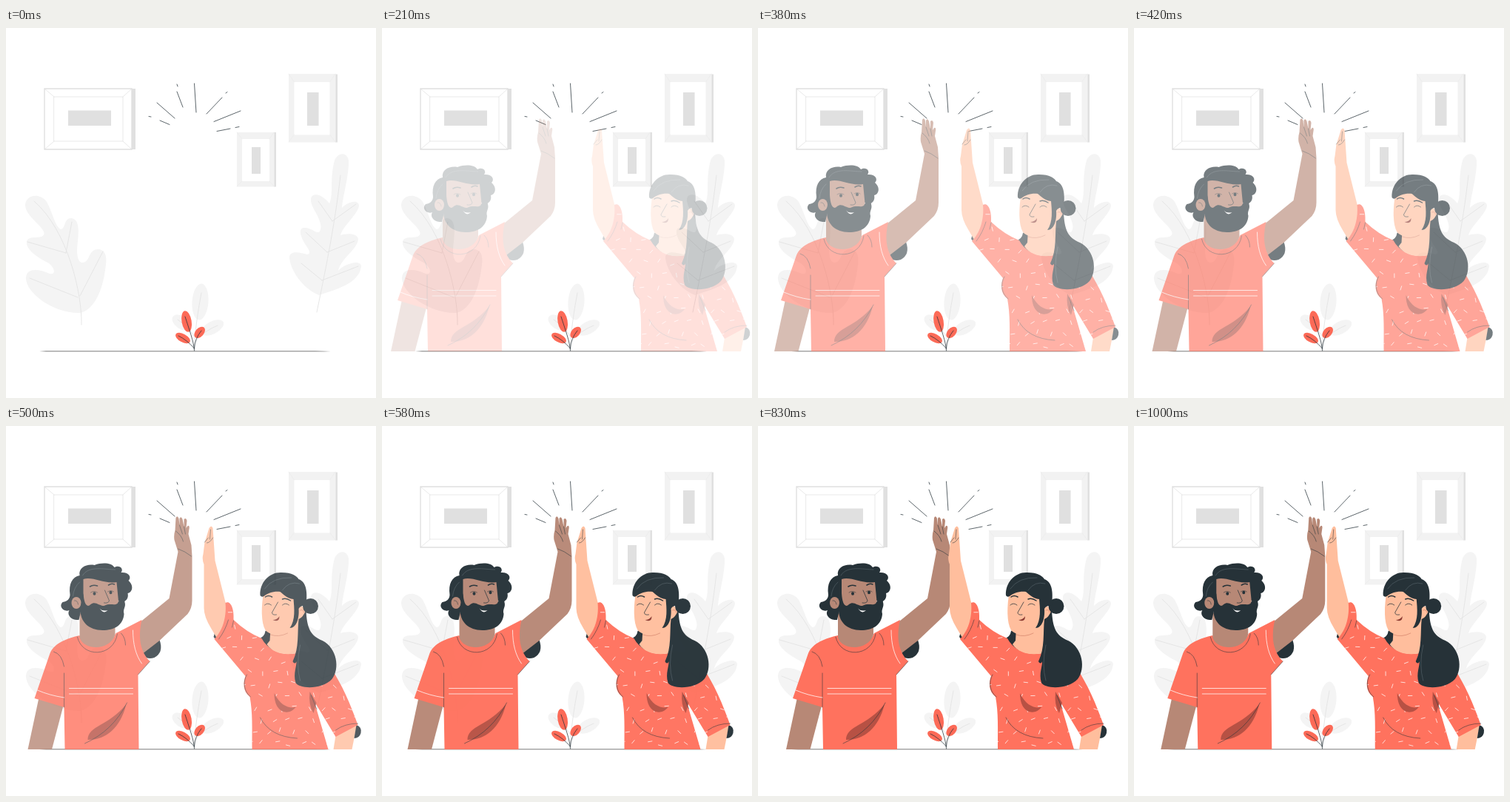
Recreate the animation shown at these times as an HTML page. Size 500 by 500 pixels, loop 1.04 s.

```html
<!DOCTYPE html>
<html lang="en">
<head>
<meta charset="utf-8">
<title>High five</title>
<style>
  html, body { margin: 0; width: 100%; height: 100%; overflow: hidden; background: #fff; }
  svg { display: block; width: 100vw; height: 100vh; }
  .line { fill: none; stroke-linecap: round; stroke-linejoin: round; }
  .ink { stroke: #263238; stroke-width: .75; }
  .thin { stroke-width: .55; }
  .vein { stroke: #e4e4e4; stroke-width: .9; }
  .edge { stroke: #e0e0e0; stroke-width: 1; }
  .white { stroke: #fff; stroke-width: .75; }
  .shine { stroke: #58666c; stroke-width: .6; }
  .dark { fill: #263238; }
  .shirt { fill: #ff725e; }
  .shade { fill: #b75144; }
  .tan { fill: #b78876; }
  .peach { fill: #ffbe9d; }
  .pale { fill: #f4f4f4; }
  .gray { fill: #e0e0e0; }
  .red { fill: #fc6a57; }
</style>
</head>
<body>
<svg viewBox="0 0 500 500">
  <defs>
    <path id="blouse" d="M288 239C295 235 300 247 299 262Q317 279 337 287C346 305 370 312 386 306L430 326C446 350 457 376 467 404L437 420L408 372L427 437H324C324 408 325 388 321 366C311 358 312 346 315 338L273 288C283 278 290 260 288 239Z"/>
    <clipPath id="blouseClip"><use href="#blouse"/></clipPath>
  </defs>

  <g id="frames">
    <path class="gray" d="M170 82h5v82h-5z"/>
    <rect class="line edge" x="52" y="82" width="118" height="82" style="stroke-width:1.4"/>
    <path class="line edge" d="M65 93H158V153H65ZM52 82L65 93M170 82L158 93M52 164L65 153M170 164L158 153" style="stroke-width:.7"/>
    <path class="gray" d="M84 111.500h58v20.500h-58zM445 62.500h3v92h-3zM362 141h3v73.500h-3z"/>
    <path class="pale" d="M382 62h63.500v92.500H382zM312 141h50.500v73.500H312z" style="fill:#f2f2f2"/>
    <path d="M389.500 73h48v71.500h-48zM319 150h37v57h-37z" fill="#fff"/>
    <path class="gray" d="M407 87h15.500v45H407zM332 161h12v36h-12z"/>
    <path class="line" stroke="#e9e9e9" stroke-width=".6" d="M382 62l7.500 11M445 62l-7.500 11M382 154l7.500-10M445 154l-7.500-10M312 141l7 9M362 141l-6 9M312 214l7-7M362 214l-6-7"/>
  </g>

  <g id="leaves">
    <path class="pale" d="M100 385C64 386 27 358 27 338C27 324 44 325 59 332C67 334 67 325 58 318C40 309 26 298 28 288C31 281 40 284 48 282C54 279 52 275 45 267C34 256 26 248 26 239C27 225 46 222 55 235C63 249 66 268 74 272C81 271 78 257 88 257C98 258 99 270 97 288C94 312 99 320 107 316C114 312 112 299 125 299C136 300 137 312 134 327C130 358 117 382 100 385Z"/>
    <path class="line vein" d="M102 401C103 360 84 274 38 234M81 304L29 289M81 304L89 262M97 364L32 338M100 362L131 302"/>
    <path class="pale" d="M423 361C400 352 383 325 383 309C385 300 399 304 407 306C414 305 408 298 403 290C396 278 396 270 403 270C411 269 418 277 423 276C428 270 425 262 419 250C411 237 410 229 415 226C423 223 432 231 437 237C443 225 437 204 444 179C449 166 465 167 463 185C462 205 455 228 454 243C460 236 476 230 477 240C476 251 455 268 452 280C460 277 476 277 476 286C474 300 452 312 449 328C457 319 479 312 480 322C477 346 446 353 423 361Z"/>
    <path class="line vein" d="M420 384C430 335 444 270 452 199M441 261L422 234M441 261L473 238M434 303L405 276M434 303L471 288M427 341L399 318M427 341L476 322"/>
    <ellipse class="pale" cx="262.500" cy="370" rx="11" ry="24.500" transform="rotate(4 262 370)"/>
    <ellipse class="pale" cx="237" cy="398" rx="14" ry="8.500" transform="rotate(35 237 398)"/>
    <ellipse class="pale" cx="279" cy="405" rx="16.500" ry="8.500" transform="rotate(-28 279 405)"/>
    <path class="line vein" d="M254 434Q256 400 264 358M255 424Q268 409 286 402M255 417Q246 404 232 394"/>
  </g>

  <path d="M45 437L54 436H418L439 437L430 437.500H54Z" fill="#a6a6a6"/>

  <g id="sprig">
    <ellipse class="red" cx="244" cy="396.500" rx="6.600" ry="14.500" transform="rotate(-10 244 396)"/>
    <ellipse class="red" cx="239" cy="419" rx="11" ry="5.500" transform="rotate(29 239 419)"/>
    <ellipse class="red" cx="262" cy="411.500" rx="5.700" ry="9" transform="rotate(42 262 411)"/>
    <path class="line ink" d="M254.500 436C254 424 247 406 242 390M254.500 433Q244 421 233 416M254.500 433Q255 420 264 409"/>
  </g>

  <path id="rays" class="line ink" d="M204 101L228 122M231 86L239 107M231 76L232 79M254.500 75L257 114M271 116L292 94M297 88L299 86.500M281 126.500L317 112M285 139.500L303 136M310 134.500L315 133.500M208 125L221 130.500M193 119.500L196 120"/>

  <g id="man">
    <path class="tan" d="M53 367L38 437H70.500L86 378Z"/>
    <path class="dark" d="M193 306L216 289Q222 306 209 313Q203 315 198 313Z"/>
    <path class="tan" d="M241 170L236 154Q235 147 237 141L238 124Q240 120 242 125L243 134L243 125Q245 121 247 126L249 136L249 126Q252 123 253 128L252 138L254 135Q257 134 256 139L255 146L259 161L260 176V236Q260 246 254 254L216 290L194 307L184 282L191 264L229 233Z"/>
    <path class="line ink thin" d="M243 134L247 146M249 136L251 146M238 142Q246 148 248 156M241 166Q250 169 259 176"/>
    <path class="shirt" d="M108 283C91 287 74 293 68 307L47 368L87 380L88 437H188L187 336L203 318C187 302 188 280 192 262L157 280C148 303 114 304 108 283Z"/>
    <path class="tan" d="M108 252V286C114 304 149 304 156 282V260Z"/>
    <path class="line ink thin" d="M105 285C111 314 154 313 159 281M87 380V334M73 305Q84 308 87 325M164 280Q170 286 170 296M187 336L203 318"/>
    <path class="line white" d="M94 354.500H180M94 362H180M51 357Q67 364 87 367M180 276C180 295 184 310 192 321"/>
    <path class="shade" d="M119 424C119 405 148 405 171 376C163 409 142 425 119 424Z"/>
    <path class="line ink thin" d="M115 429Q153 412 172 374"/>

    <path class="dark" d="M107 262C98 263 90 256 94 249C87 252 79 244 85 238C92 237 95 233 95 228C93 213 98 204 108 202C106 191 118 186 128 188C139 184 151 185 155 191C162 187 168 193 164 198C174 197 179 204 174 209C182 216 179 225 173 226C175 234 168 241 160 236L150 220L112 240Z"/>
    <path class="tan" d="M113 207C126 203 141 214 158 211L161 242C161 262 145 270 130 268L113 258Z"/>
    <ellipse class="tan" cx="103.500" cy="239" rx="6.500" ry="8"/>
    <path class="line ink thin" d="M101 236Q105 235 106 241"/>
    <path class="dark" d="M113 226C114 241 118 246 123 241C129 236 134 243 141 243C149 239 155 243 159 240C163 232 168 231 169 238C171 245 166 247 168 254C167 269 155 276 139 276C121 276 108 265 109 246Z"/>
    <path d="M135 246Q138 251 146 249Q140 255 135 246Z" fill="#fff"/>
    <path class="line ink" d="M142 222L148 236Q147 240 141 239"/>
    <path class="line ink" d="M122 217Q126 214 132 216M147 215Q151 212 155 214" style="stroke-width:1.600"/>
    <path class="dark" d="M126 226.500a2 2.200 0 1 0 4 0a2 2.200 0 1 0-4 0M148 225a2 2.200 0 1 0 4 0a2 2.200 0 1 0-4 0"/>
    <path class="line ink thin" d="M123 225Q127 222 132 225M146 224Q150 221 154 224"/>
    <path class="line shine" d="M112 202C120 188 142 194 156 194M99 230Q100 218 108 211"/>
  </g>

  <g id="woman">
    <path class="peach" d="M438 412L434 437H459L466 402Z"/>
    <path class="dark" d="M465 404Q473 407 471 415Q469 422 462 422Z"/>
    <path class="dark" d="M274 278L272 285L277 291L284 284Z"/>
    <path class="peach" d="M260 157L262 151L266 138Q269 133 271 138L274 182L288 238L302 268L279 291L269 274Q259 258 259 246V187Q256 180 258 173Z"/>
    <path class="line ink thin" d="M268 140L267 153M260 157L265 151M271 151Q267 158 263 158"/>
    <path class="dark" d="M349 273L352 305L345 299L331 288Q341 286 342 277Z"/>
    <use class="shirt" href="#blouse"/>
    <g id="dashes" class="line white" clip-path="url(#blouseClip)"></g>
    <path class="shade" d="M354 361C362 378 374 382 383 380C374 392 354 389 354 361ZM402 359Q400 377 407 388L411 374Z"/>
    <path class="line ink thin" d="M317 336C311 346 313 359 322 366M335 394Q348 420 385 422M404 364L411 382M437 411Q449 402 467 402M299 263L297 272M292 262Q288 276 279 288"/>
    <path class="peach" d="M349 274L348 290L344 295C354 310 376 310 387 306L390 258Z"/>
    <path class="peach" d="M340 222C336 245 336 265 342 276C352 286 370 284 381 271L391 256V222Z"/>
    <ellipse class="peach" cx="391" cy="252" rx="6" ry="8"/>
    <path class="line" stroke="#d98a70" stroke-width=".8" d="M349 282Q360 286 372 280M389 249Q393 247 394 252"/>
    <circle class="dark" cx="403" cy="243.500" r="10.500"/>
    <path class="dark" d="M397 248C398 274 403 283 419 290C439 300 443 328 432 342C419 356 389 356 383 347C379 334 385 324 384 316C385 321 380 322 379 318C388 300 385 279 387 261Q393 259 397 248Z"/>
    <path class="dark" d="M335 229C334 211 348 197 364 198C378 198 385 203 387 207C398 211 399 225 397 243Q390 242 387 247C388 260 384 273 375 273C383 262 381 246 380 234C371 233 366 227 362 224C353 223 345 226 340 230Q337 232 335 229Z"/>
    <path class="line shine" d="M341 220Q352 204 377 205M365 222Q374 209 388 213M389 296Q383 323 389 344"/>
    <path class="line ink" d="M341 242Q345 238 350 242M365 242Q369 238 374 242M359 238L351 252Q351 256 357 255"/>
    <path class="line ink" d="M342 231Q346 228 351 231M365 234Q370 232 376 236" style="stroke-width:1.500"/>
    <path d="M352 262Q358 262 361 257Q361 266 352 262Z" fill="#8c3b32"/>
  </g>
</svg>
<script>
  const LOOP = 1040, STEP = 1000 / 24;
  const SLIDE = 30, SWAY = 2.5;
  const man = document.getElementById('man');
  const woman = document.getElementById('woman');
  const clamp = v => Math.min(1, Math.max(0, v));

  // Small strokes scattered over the blouse on a jittered grid
  function scatterDashes() {
    let seed = 7, d = '';
    const random = () => (seed = seed * 16807 % 2147483647) / 2147483647;
    for (let y = 250; y < 437; y += 16) {
      for (let x = 276 + y % 32 / 2; x < 470; x += 18) {
        const angle = random() * Math.PI;
        const dx = 2.7 * Math.cos(angle), dy = 2.7 * Math.sin(angle);
        const cx = x + random() * 6, cy = y + random() * 6;
        d += `M${cx - dx} ${cy - dy}L${cx + dx} ${cy + dy}`;
      }
    }
    document.getElementById('dashes').innerHTML = `<path d="${d}"/>`;
  }

  function place(person, x, opacity) {
    person.setAttribute('transform', `translate(${x.toFixed(2)} 0)`);
    person.setAttribute('opacity', opacity.toFixed(3));
  }

  // Fade and slide in together, then lean towards each other and back
  function update(time) {
    const tick = Math.floor(time % LOOP / STEP + 0.1);
    const enter = clamp((tick - 2.4) / 12);
    const lean = Math.sin(Math.PI * clamp((tick - 15) / 10));
    const gap = SLIDE * (1 - enter) + SWAY * (1 - lean);
    place(man, -gap, enter);
    place(woman, gap, enter);
  }

  function loop() {
    update(performance.now());
    requestAnimationFrame(loop);
  }

  scatterDashes();
  update(0);
  requestAnimationFrame(loop);
</script>
</body>
</html>
```
